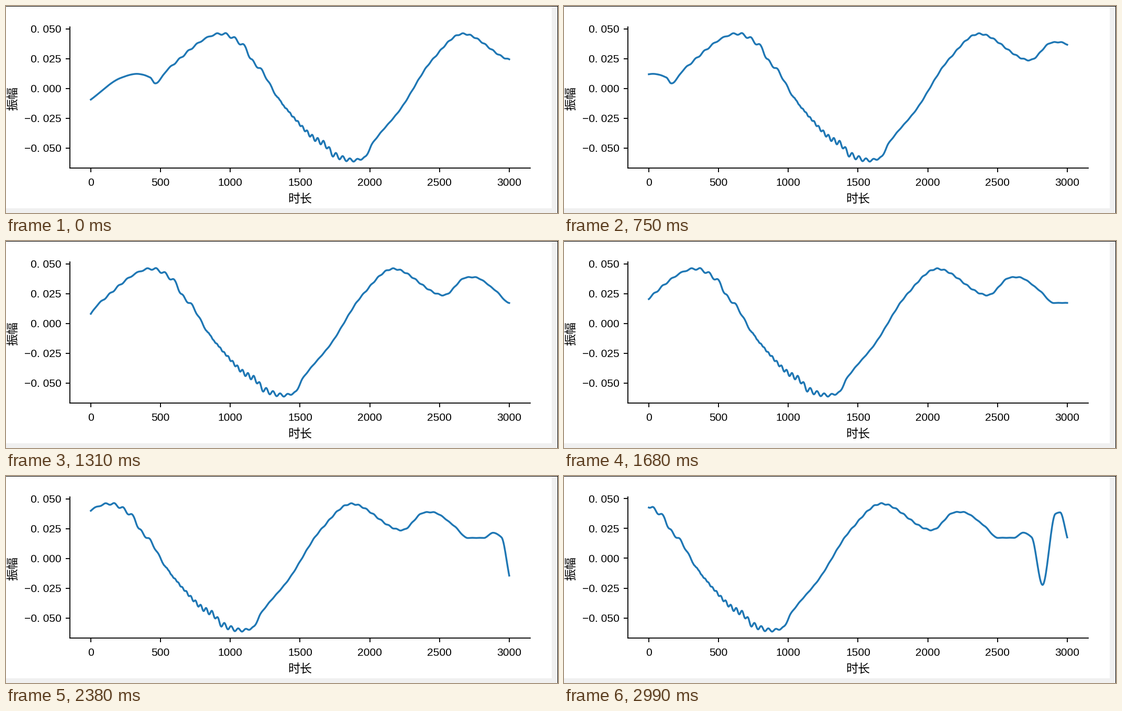
A matplotlib script for the animation above (3040 ms loop, 1054 px wide and 396 px high).

```python
import numpy as np
import matplotlib.pyplot as plt
from matplotlib.animation import FuncAnimation
from matplotlib.patches import Rectangle

W, H, DPI = 1054, 396, 100
STEP_MS, LOOP_MS = 10, 3040
SPAN, HOP = 3000, 100
HOP_TIMES = [50, 370, 650, 980, 1310, 1680, 1960, 2290, 2610, 2940]

# Key points of the smooth trend: sample position, amplitude in thousandths
TREND = np.array([
    (0, -9.4), (215, 8.8), (331, 12.2), (425, 9.3), (460, 4.2), (556, 16.5),
    (935, 45.9), (1110, 34), (1150, 24), (1225, 15), (1330, -6),
    (1480, -27.7), (1595, -41.3), (1690, -48), (1730, -54.7), (1886, -60.3),
    (1966, -57.8), (2015, -47), (2220, -17.4), (2446, 23.6), (2668, 45.8),
    (3032, 23.7), (3190, 38.5), (3245, 38.8), (3404, 27.4), (3502, 17.2),
    (3620, 17.2), (3683, 21.5), (3745, 17.6), (3823, -22.3), (3915, 37.2),
    (3949, 38.5), (4001, 17.1),
])


def monotone_curve(x, kx, ky):
    """Cubic Hermite curve that never overshoots its key points."""
    h = np.diff(kx)
    d = np.diff(ky) / h
    m = np.zeros_like(ky)
    m[0], m[-1] = d[0], d[-1]
    same = d[:-1] * d[1:] > 0
    a, b = d[:-1][same], d[1:][same]
    m[1:-1][same] = 2 * a * b / (a + b)
    i = np.clip(np.searchsorted(kx, x, side="right") - 1, 0, len(h) - 1)
    t = (x - kx[i]) / h[i]
    return (ky[i] * (1 + 2 * t) * (1 - t) ** 2
            + ky[i + 1] * t * t * (3 - 2 * t)
            + h[i] * t * (1 - t) * (m[i] * (1 - t) - m[i + 1] * t))


def packet(x, cycles, amp, center, width):
    """Ripple that fades out on both sides of its center."""
    fade = np.exp(-((x - center) / width) ** 2 / 2)
    return amp * fade * np.cos(2 * np.pi * cycles)


def chirp(x):
    """Cycle count of a ripple whose crests lie at 1627 + 40.2 n + 1.2 n^2."""
    u = np.maximum(x, 1300) - 1627
    return (np.sqrt(40.2 ** 2 + 4.8 * u) - 40.2) / 2.4


def wave(x):
    y = monotone_curve(x, TREND[:, 0], TREND[:, 1])
    y += packet(x, (x - 633) / 62, 0.7, 690, 130)
    y += packet(x, (x - 1097) / 64, 1.5, 1090, 170)
    y += packet(x, chirp(x), 2.3, 1700, 150)
    y += packet(x, (x - 2128) / 54, 0.5, 2750, 420)
    return y / 1000


def px(n):
    """Pixels to points."""
    return n * 72 / DPI


def box(x, y, w, h, color):
    fig.add_artist(Rectangle((x / W, 1 - (y + h) / H), w / W, h / H,
                             transform=fig.transFigure, facecolor=color,
                             linewidth=0, zorder=-1))


def label(x, y, text, **kw):
    fig.text(x / W, 1 - y / H, text, family="Noto Sans CJK JP",
             fontsize=px(23), ha="center", va="baseline",
             rotation_mode="anchor", **kw)


fig = plt.figure(figsize=(W / DPI, H / DPI), dpi=DPI, facecolor="#f0f0f0")
box(0, 0, 1042, 387, "white")
box(0, 0, W, 1, "black")
box(W - 1, 0, 1, H, "black")

left, right, top, bottom = 122, 1000.8, 39.5, 310
ax = fig.add_axes([left / W, 1 - bottom / H,
                   (right - left) / W, (bottom - top) / H], facecolor="none")
for side in ("top", "right"):
    ax.spines[side].set_visible(False)
for side in ("left", "bottom"):
    ax.spines[side].set_linewidth(px(1.85))
ax.tick_params(length=px(8), width=px(1.85), labelsize=px(21),
               labelfontfamily="Liberation Sans")
ax.tick_params(axis="x", pad=px(11))
ax.tick_params(axis="y", pad=px(8.5))

levels = np.arange(-2, 3) * 0.025
ax.set_xticks(range(0, SPAN + 1, 500))
ax.set_yticks(levels, [f"{v:.3f}".replace(".", ". ").replace("-", "\u2212")
                       for v in levels])
ax.set_xlim(-0.05 * SPAN, 1.05 * SPAN)
label(561, 375.5, "时长")
label(20.3, 177, "振幅", rotation=90)

xs = np.arange(0, SPAN + 1, 4.0)
line, = ax.plot(xs, wave(xs), color="#1f77b4", linewidth=px(3.45))


def draw(k):
    shift = HOP * sum(k * STEP_MS >= t for t in HOP_TIMES)
    ys = wave(xs + shift)
    margin = 0.05 * np.ptp(ys)
    line.set_ydata(ys)
    ax.set_ylim(ys.min() - margin, ys.max() + margin)
    return line,


anim = FuncAnimation(fig, draw, frames=LOOP_MS // STEP_MS, interval=STEP_MS,
                     repeat=True, repeat_delay=0)
plt.show()
```
